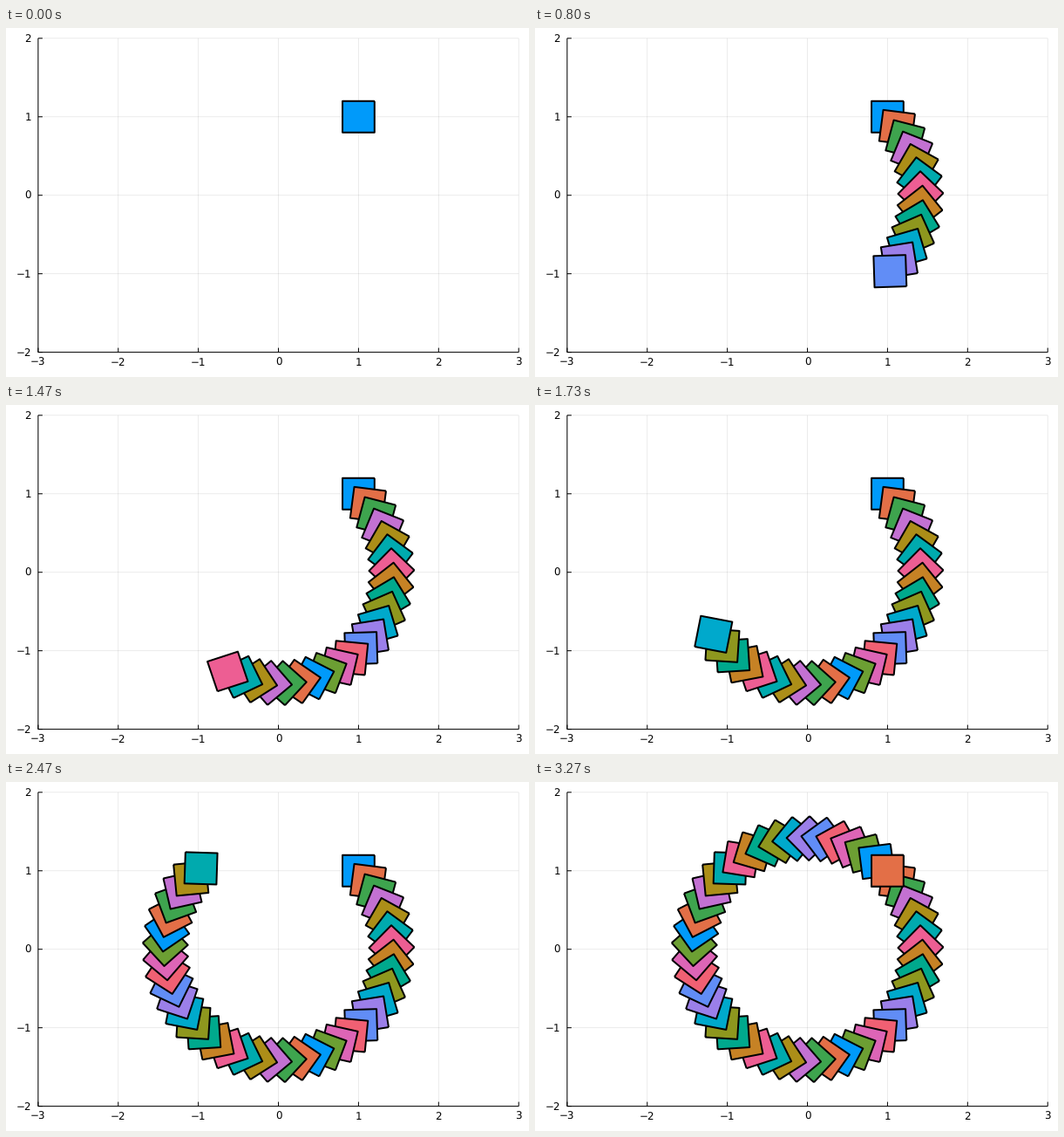
A matplotlib script for the animation above (3340 ms loop, 600x400 px).

```python
import matplotlib.pyplot as plt
import numpy as np
from matplotlib.animation import FuncAnimation
from matplotlib.patches import PathPatch
from matplotlib.path import Path

WIDTH, HEIGHT, DPI = 600, 400, 100
LEFT, RIGHT, TOP, BOTTOM = 36.87, 588.19, 11.81, 371.61
TICK = 5
PX = 72 / DPI  # points per pixel
STEPS = 50
TICKS_PER_LOOP, INTERVAL = 334, 10
PALETTE = [
    "#009afa", "#e36f47", "#3ea44e", "#c371d2", "#ac8e18", "#00aaae",
    "#ed5e93", "#c68225", "#00a98d", "#8e971e", "#00a9cc", "#9b7fe9",
    "#618df6", "#f06073", "#dd65b6", "#6c9f33",
]

plt.rcParams["font.family"] = "DejaVu Sans"
plt.rcParams["text.hinting"] = "none"

fig = plt.figure(figsize=(WIDTH / DPI, HEIGHT / DPI), dpi=DPI, facecolor="white")
ax = fig.add_axes([0, 0, 1, 1])
ax.set_xlim(0, WIDTH)
ax.set_ylim(HEIGHT, 0)
ax.axis("off")


def to_px(x, y):
    return (LEFT + (x + 3) * (RIGHT - LEFT) / 6,
            BOTTOM - (y + 2) * (BOTTOM - TOP) / 4)


def line(x0, y0, x1, y1, width=1.0, alpha=1.0):
    ax.plot([x0, x1], [y0, y1], color="black", lw=width * PX, alpha=alpha,
            solid_capstyle="butt", snap=False, zorder=1)


def label(x, y, value, align):
    ax.text(x, y, str(value).replace("-", "\u2212"), size=11.85 * PX,
            ha=align, va="baseline")


def draw_axes():
    for value in range(-3, 4):
        x, _ = to_px(value, 0)
        line(x, TOP, x, BOTTOM, 0.75, 0.1)
        line(x, BOTTOM, x, BOTTOM - TICK)
        label(x, BOTTOM + 15.4, value, "center")
    for value in range(-2, 3):
        _, y = to_px(0, value)
        line(LEFT, y, RIGHT, y, 0.75, 0.1)
        line(LEFT, y, LEFT + TICK, y)
        label(29, y + 4.3, value, "right")
    line(LEFT, BOTTOM, RIGHT, BOTTOM)
    line(LEFT, BOTTOM, LEFT, TOP)


def make_square(step):
    """Unit-offset square turned clockwise about the origin."""
    angle = -2 * np.pi * step / (STEPS - 1)
    x = np.array([1.2, 0.8, 0.8, 1.2, 1.2])
    y = np.array([1.2, 1.2, 0.8, 0.8, 1.2])
    c, s = np.cos(angle), np.sin(angle)
    outline = np.column_stack(to_px(c * x - s * y, s * x + c * y))
    return ax.add_patch(PathPatch(
        Path(outline), facecolor=PALETTE[step % len(PALETTE)],
        edgecolor="black", lw=2 * PX, joinstyle="round", capstyle="butt",
        snap=False, zorder=3 + step / STEPS))


draw_axes()
squares = [make_square(step) for step in range(STEPS)]


def update(tick):
    # 15 steps per second, rounded to hundredths of a second
    current = min((3 * tick + 1) // 20, STEPS - 1)
    for step, square in enumerate(squares):
        square.set_visible(step <= current)
    return squares


animation = FuncAnimation(fig, update, frames=TICKS_PER_LOOP, interval=INTERVAL,
                          init_func=lambda: update(0), repeat=True,
                          repeat_delay=0, blit=False)
plt.show()
```
